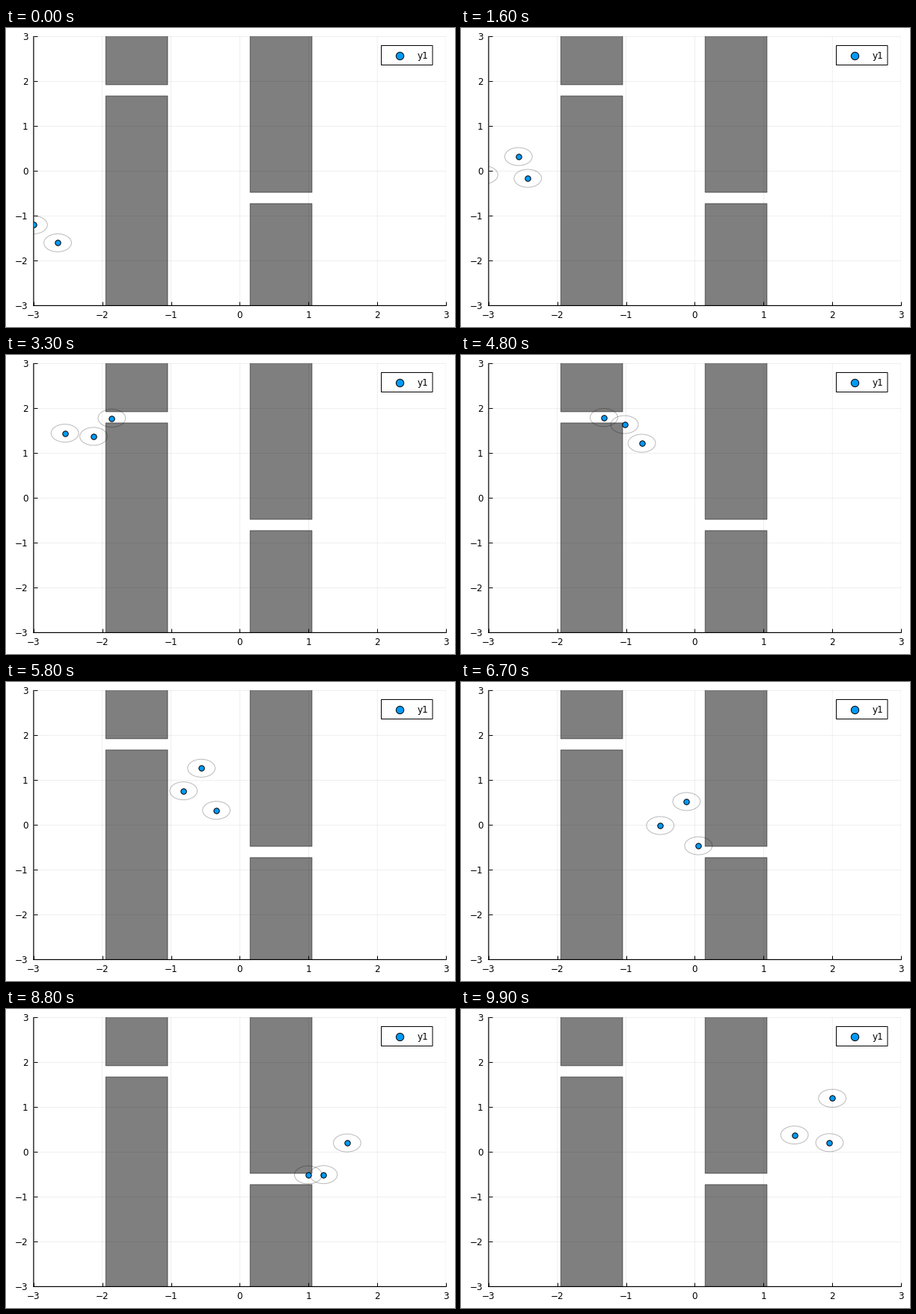
Recreate the animation shown at these times as a matplotlib script. Size 600 px wide and 400 px high, loop 10 s.

```python
import numpy as np
import matplotlib.pyplot as plt
from matplotlib.animation import FuncAnimation
from matplotlib.patches import Ellipse, Rectangle

W, H, DPI = 600, 400, 100
FRAMES, STEP = 100, 100
PX = 72 / DPI  # points per pixel
BLUE = "#009afa"

plt.rcParams.update({"font.family": "DejaVu Sans", "font.size": 12 * PX,
                     "path.snap": False})

# Turning points of each route: start, first gate, second gate, end
LEADER = [(-3, -1.2), (-2.58, .31), (-1.95, 1.83), (-1.05, 1.8),
          (.12, -.63), (1.1, -.6), (1.6, .26), (2, 1.2)]
RIGHT = [(-2.65, -1.6), (-2.74, -.85), (-2.2, .35), (-2.18, 1.35),
         (-1.9, 1.76), (-.98, 1.73), (-.9, 1), (-.56, 0),
         (.15, -.58), (1.15, -.6), (1.96, .21)]
LEFT = [(-3.35, -1.6), (-3.1, -.1), (-2.75, .5), (-2.55, 1.55),
        (-2.05, 1.92), (-1.1, 1.76), (-.68, 1.46), (-.08, .52),
        (-.02, -.36), (.2, -.58), (1.1, -.54), (1.45, .38)]


def walk(route, round_off=.03, samples=41):
    """Follow the route at constant speed, averaging over its corners."""
    x, y = np.array(route).T
    s = np.r_[0, np.cumsum(np.hypot(np.diff(x), np.diff(y)))]
    u = np.linspace(0, 1, FRAMES)
    reach = np.minimum(round_off, np.minimum(u, 1 - u))
    at = u[:, None] + reach[:, None] * np.linspace(-1, 1, samples)
    return np.column_stack([np.interp(at, s / s[-1], p).mean(axis=1)
                            for p in (x, y)])


paths = [walk(r) for r in (LEADER, RIGHT, LEFT)]

fig = plt.figure(figsize=(W / DPI, H / DPI), dpi=DPI, facecolor="white")
x0, x1, top, base = 36.9, 588, 11.4, 371.4
ax = fig.add_axes([x0 / W, 1 - base / H, (x1 - x0) / W, (base - top) / H])
ax.set(xlim=(-3, 3), ylim=(-3, 3), xticks=range(-3, 4), yticks=range(-3, 4))
ax.set_axisbelow(True)
ax.grid(color="black", alpha=.1, lw=.6 * PX)
ax.tick_params(direction="in", length=5 * PX, width=PX)
ax.tick_params(axis="x", pad=6.8 * PX)
ax.tick_params(axis="y", pad=7.5 * PX)
for side, spine in ax.spines.items():
    spine.set(visible=side in ("left", "bottom"), linewidth=1.2 * PX, zorder=1)

# Walls, each with one gap
for left, low, high in [(-1.95, 1.675, 1.925), (.15, -.725, -.475)]:
    for y, h in [(-4, low + 4), (high, 4 - high)]:
        ax.add_patch(Rectangle((left, y), .9, h, fc=(0, 0, 0, .5),
                               ec=(0, 0, 0, .5), lw=PX, zorder=2))

agents = []
for k in range(len(paths)):
    ring = ax.add_patch(Ellipse((0, 0), .4, .4, fill=False, lw=PX,
                                ec=(0, 0, 0, .27), zorder=3 + k))
    dot, = ax.plot([], [], "o", ms=7.4 * PX, mfc=BLUE, mec="black",
                   mew=PX, zorder=3.5 + k)
    agents.append((ring, dot))

# Legend in pixel coordinates
key = fig.add_axes([0, 0, 1, 1], zorder=5)
key.set(xlim=(0, W), ylim=(H, 0))
key.axis("off")
key.add_patch(Rectangle((501.5, 23.5), 68.5, 26, fc="white", ec="black", lw=PX))
key.plot(526, 36.6, "o", ms=10.3 * PX, mfc=BLUE, mec="black", mew=PX)
key.text(549.5, 41, "y1", va="baseline")


def draw(n):
    for (ring, dot), path in zip(agents, paths):
        x, y = path[n]
        ring.set_center((x, y))
        dot.set_data([x], [y])
    return [a for pair in agents for a in pair]


anim = FuncAnimation(fig, draw, frames=FRAMES, interval=STEP,
                     repeat=True, repeat_delay=0)
plt.show()
```
